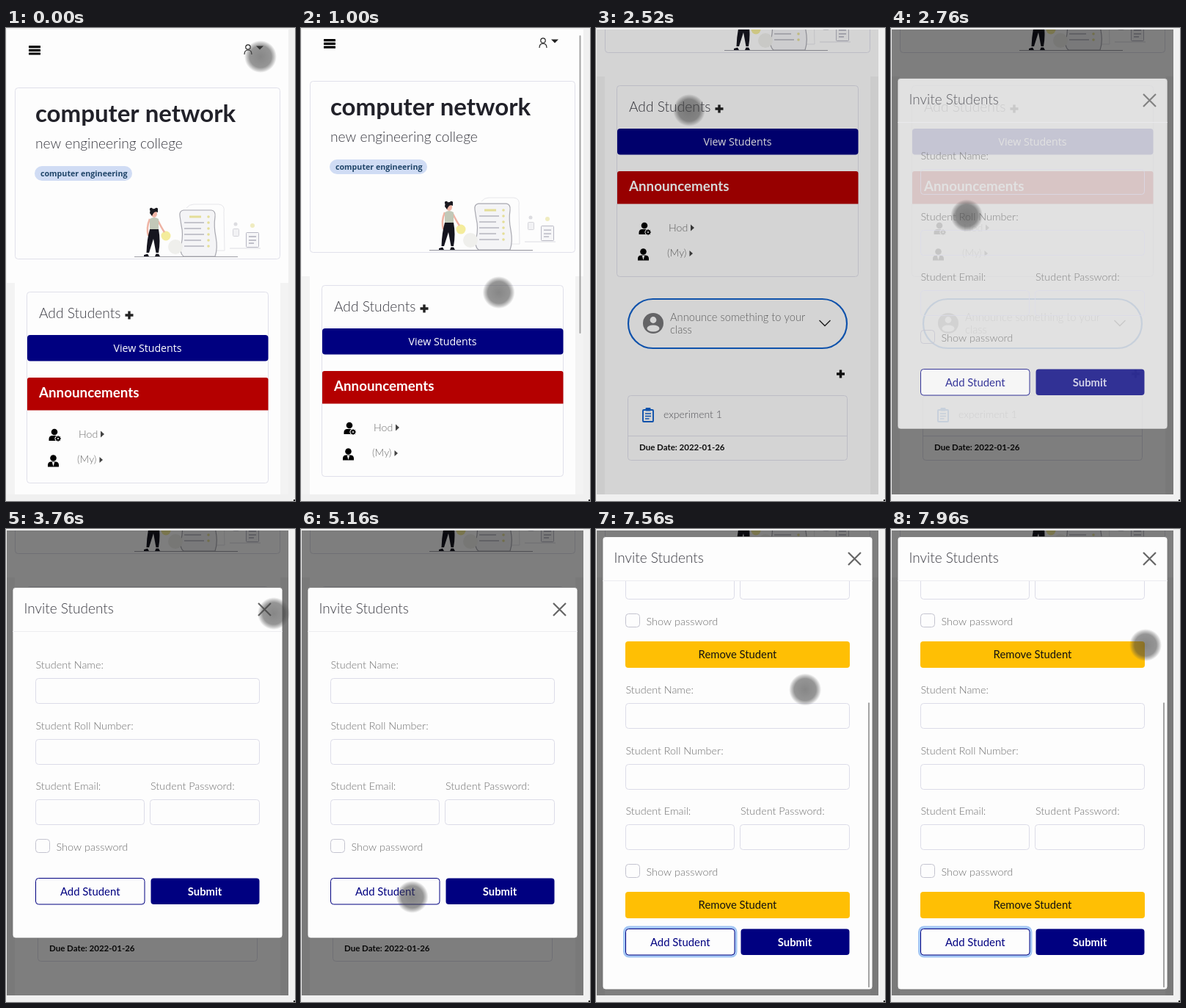
These frames come from a looping animation (394 by 644 pixels, 8 s). An HTML page with a canvas:

```html
<!DOCTYPE html>
<html lang="en">
<head>
<meta charset="utf-8">
<title>Classroom page</title>
<style>
html, body { margin: 0; width: 100%; height: 100%; overflow: hidden; background: #f0f0f0; }
canvas { display: block; }
</style>
</head>
<body>
<canvas id="stage" width="394" height="644"></canvas>
<script>
const ctx = document.getElementById('stage').getContext('2d');
const LOOP = 8000, OUTER = '#f0f0f0', PAPER = '#fdfdfd', LINE = '#e0e0ea';
const NAVY = '#000080', BLUE = '#1262cc', GREY = '#707070';
const HEAD = 'Lato, "Open Sans", sans-serif', UI = '"Open Sans", "Noto Sans", sans-serif';

// [time, x, y] of the touch pointer
const TOUCH = [
  [0, 347, 39], [40, 347, 39], [640, 272, 369], [800, 272, 369], [1560, 243, 278],
  [2040, 190, 154], [2400, 127, 112], [2580, 127, 112], [3000, 67, 473], [3140, 67, 473],
  [3760, 365, 115], [4620, 365, 115], [4760, 338, 40], [4920, 262, 270], [5080, 180, 521],
  [5160, 152, 501], [5360, 87, 497], [5460, 87, 497], [6300, 302, 193], [6720, 258, 431],
  [7140, 247, 457], [7560, 285, 219], [7960, 347, 158], [8000, 347, 158]
];
const SCROLL = [[0, 0], [800, 0], [1560, 91], [2040, 215], [2340, 281], [8000, 281]];

const clamp = (v, a = 0, b = 1) => Math.min(b, Math.max(a, v));
const ramp = (t, a, b) => clamp((t - a) / (b - a));
const easeOut = p => 1 - (1 - p) ** 3;

function slope(keys, i, k) {
  const a = keys[i - 1], b = keys[i], c = keys[i + 1];
  if (!a || !c || a[k] === b[k] || b[k] === c[k]) return 0;
  return (c[k] - a[k]) / (c[0] - a[0]);
}

// Cubic Hermite through timed keys, at rest beside every hold
function track(keys, t, k) {
  let i = 0;
  while (i < keys.length - 2 && t >= keys[i + 1][0]) i++;
  const a = keys[i], b = keys[i + 1], d = b[0] - a[0], p = clamp((t - a[0]) / d);
  const q = p * p, r = q * p;
  return a[k] * (2 * r - 3 * q + 1) + b[k] * (3 * q - 2 * r) +
    d * (slope(keys, i, k) * (r - 2 * q + p) + slope(keys, i + 1, k) * (r - q));
}

function box(x, y, w, h, r, fill, stroke, lw = 1) {
  ctx.beginPath();
  ctx.roundRect(x, y, w, h, r);
  if (fill) { ctx.fillStyle = fill; ctx.fill(); }
  if (stroke) { ctx.strokeStyle = stroke; ctx.lineWidth = lw; ctx.stroke(); }
}

function frame(x, y, w, h, r, stroke, fill) {
  box(x + .5, y + .5, w - 1, h - 1, r, fill, stroke);
}

function text(s, x, y, size, color, weight = 300, family = HEAD, align = 'left') {
  ctx.font = `${weight} ${size}px ${family}`;
  ctx.fillStyle = color;
  ctx.textAlign = align;
  ctx.fillText(s, x, y);
}

function dot(x, y, r, color, ry = r) {
  ctx.beginPath();
  ctx.ellipse(x, y, r, ry, 0, 0, 7);
  ctx.fillStyle = color;
  ctx.fill();
}

function shape(d, fill, stroke, lw = 1, x = 0, y = 0) {
  const path = new Path2D(d);
  ctx.save();
  ctx.translate(x, y);
  if (fill) { ctx.fillStyle = fill; ctx.fill(path); }
  if (stroke) { ctx.strokeStyle = stroke; ctx.lineWidth = lw; ctx.stroke(path); }
  ctx.restore();
}

function plus(x, y, color) {
  shape('M-5.5 0H5.5M0-5.5V5.5', null, color, 3.4, x, y);
}

function person(x, y) {
  dot(x, y - 4, 4.3, '#000');
  shape('M-7.5 8V5Q-7 1-3 1H3Q7 1 7.5 5V8Z', '#000', null, 1, x, y);
}

function gear(x, y) {
  dot(x, y, 4.6, PAPER);
  for (let i = 0; i < 4; i++) {
    const c = Math.cos(i * Math.PI / 4) * 3.8, s = Math.sin(i * Math.PI / 4) * 3.8;
    shape(`M${-c} ${-s}L${c} ${s}`, null, '#000', 1.6, x, y);
  }
  dot(x, y, 2.6, '#000');
  dot(x, y, 1.1, PAPER);
}

function illustration() {
  shape('M246 245Q250 240 256 240H290Q299 241 297 251L298 303H286', null, '#e6e6ea');
  shape('M237 256Q236 249 242 248H280Q286 249 285 257Q283 270 286 284Q289 300 285 311H242Q236 306 239 295Q242 280 239 269Z',
    '#f4f4f6', '#a8a8b0', 1.2);
  for (let i = 0; i < 6; i++) {
    const y = 257 + i * 8;
    shape(`M${i ? 243 : 250} ${y}H${i % 2 ? 270 : 266}`, null, i ? '#c4c4cc' : '#e4de98', i ? 2 : 3);
    dot(276, y, 1.8, '#e4de98');
  }
  dot(231, 298, 10, '#efefec');
  dot(218, 283, 6.5, '#f4ec9c');
  dot(313, 267, 2.5, '#dcdce0');
  box(309.5, 273.5, 8, 10, 1, '#f2f2f4', '#d4d4da');
  dot(336, 269, 3, '#f0ecc0');
  box(327.5, 278.5, 17, 20, 1, '#f6f6f8', '#b8b8c4');
  shape('M331 284H341M331 289H341M331 293H338', null, '#aeaeba', 1.3);
  shape('M305 300H347', null, '#dcdce2');
  shape('M196 260Q191 272 194 283M207 262Q212 272 216 278', null, '#eeb3a4', 2.5);
  shape('M196 260Q202 256 208 260L208 276H196Z', '#c2c8b8');
  shape('M196 274H208Q211 290 208 306H204.5L201 287L195 306H191.5Q192 288 196 274Z', '#15151f');
  shape('M188 311V309L193 307.5L195 311ZM203 311L204.5 307.5H208L210 311Z', '#15151f');
  dot(202, 253, 4, '#f0b6a6', 5);
  shape('M196 252Q196 246 202 246Q208 246 207 251Q202 248 199 256Z', '#1a1a20');
  dot(198, 247, 2.2, '#1a1a20');
  dot(205, 247, 2.2, '#1a1a20');
  shape('M175 311.5H316', null, '#a0a0a8', 1.2);
}

function page() {
  box(1, 347, 11, 700, 0, '#f3f3f3');
  box(374, 347, 11, 700, 0, '#f3f3f3');

  for (let i = 0; i < 3; i++) box(31, 24 + i * 4.7, 16, 3.2, .5, '#000');
  ctx.beginPath();
  ctx.arc(330, 26, 3.2, 0, 7);
  ctx.strokeStyle = '#222';
  ctx.lineWidth = 1.2;
  ctx.stroke();
  shape('M325 36Q325 30 330 30Q335 30 335 36', null, '#222', 1.2);
  shape('M341 24.5H351L346 29.5Z', '#222');

  frame(12, 81, 362, 234, 4, LINE);
  text('computer network', 40, 128, 33, '#212129', 700);
  text('new engineering college', 40, 164, 19.3, '#3c3c44');
  box(39, 188, 133, 20, 10, '#d0dcf4');
  text('computer engineering', 47, 202, 10.7, '#1f4468', 700, UI);
  illustration();

  frame(28, 359, 330, 261, 4, LINE);
  text('Add Students', 45, 395, 19.2, '#3c3c44');
  plus(168, 391, '#222');
  box(29, 418, 328.5, 35.5, 4, NAVY);
  text('View Students', 193, 441, 14.2, '#fff', 400, UI, 'center');
  box(29, 476, 328.5, 44.5, [3, 3, 0, 0], '#b40000');
  text('Announcements', 45, 503, 18.8, '#fff', 700);
  person(66, 554);
  gear(71, 559);
  text('Hod', 99, 558, 14.2, GREY);
  shape('M129 548.5L134 553L129 557.5Z', '#444');
  person(64.5, 589.5);
  shape('M62.8 591H66.2L64.5 597Z', PAPER);
  text('(My)', 97, 592, 14, GREY);
  shape('M127.5 584L132 588L127.5 592Z', '#444');

  box(44, 650, 298, 67, 33.5, PAPER, BLUE, 2.2);
  dot(78, 683, 14, '#77777a');
  dot(78, 678.5, 4.4, PAPER);
  dot(78, 690, 8.5, PAPER, 4.5);
  text('Announce something to your', 101, 680, 14.7, GREY);
  text('class', 101, 697, 14.7, GREY);
  shape('M304.5 679L312 686.5L319.5 679', null, '#222', 1.4);

  plus(333.5, 752, '#111');
  frame(43, 781, 300, 89, 4, LINE);
  box(64, 801, 14, 16, 1, null, BLUE, 1.9);
  box(67.5, 798, 7, 4.5, 1, BLUE);
  shape('M67 806H75M67 809.5H75M67 813H72.5', null, BLUE, 1.4);
  text('experiment 1', 92, 812, 14, '#606066');
  shape('M44 836.5H342', null, LINE);
  text('Due Date: 2022-01-26', 59, 856, 11.5, '#111', 700);
}

function label(s, x, y) {
  text(s + ':', x, y, 14.4, GREY);
}

function field(x, y, w) {
  frame(x, y, w, 35, 4, '#dcdce8');
}

function form(y, removable) {
  label('Student Name', 40.5, y + 110);
  field(40, y + 123, 306);
  label('Student Roll Number', 40.5, y + 193);
  field(40, y + 206, 306);
  label('Student Email', 40.5, y + 275);
  label('Student Password', 197, y + 275);
  field(40, y + 288, 149);
  field(196, y + 288, 150);
  frame(40, y + 342, 20, 19, 4, '#c4c4d0');
  text('Show password', 68.5, y + 358, 14.5, GREY);
  if (removable) {
    box(40, y + 380, 306, 36, 4, '#ffbf04');
    text('Remove Student', 193, y + 403, 14.8, '#111', 400, HEAD, 'center');
  }
}

function thumb(x, y, h) {
  box(x, y, 2, h, 1, '#a4a4a4');
}

function modal(grown, scroll) {
  const top = grown ? 11 : 80, bottom = grown ? 627 : 557;
  box(9, top - .5, 368, bottom - top + .5, 4, PAPER, '#707070', .8);
  ctx.save();
  ctx.beginPath();
  ctx.rect(9, top + 59, 368, bottom - top - 60);
  ctx.clip();
  const y = top - scroll;
  form(y, grown);
  if (grown) form(y + 341, true);
  const row = y + (grown ? 771 : 395);
  if (grown) box(39, row - 1.5, 151.5, 39, 6, null, '#a3c6f4', 4);
  frame(40, row, 149.5, 36.5, 4, NAVY, PAPER);
  text('Add Student', 114.7, row + 23.5, 14.9, NAVY, 400, HEAD, 'center');
  box(197.5, row + .5, 148, 35.5, 4, NAVY);
  text('Submit', 271, row + 23.5, 14.8, '#fff', 700, HEAD, 'center');
  ctx.restore();
  shape(`M9 ${top + 59.5}H377`, null, '#ececf0');
  text('Invite Students', 24.5, top + 35, 19, '#3c3c44');
  shape('M-8.5-8.5L8.5 8.5M8.5-8.5L-8.5 8.5', null, '#666', 2.2, 352.5, top + 29.5);
  if (grown) thumb(371, 72 + scroll * .69, 388);
}

function pointer(x, y) {
  const g = ctx.createRadialGradient(x, y, 0, x, y, 22);
  g.addColorStop(0, 'rgba(62,62,62,.62)');
  g.addColorStop(.68, 'rgba(68,68,68,.56)');
  g.addColorStop(.85, 'rgba(80,80,80,.3)');
  g.addColorStop(1, 'rgba(80,80,80,0)');
  dot(x, y, 22, g);
}

function draw(t) {
  const x = track(TOUCH, t, 1), y = track(TOUCH, t, 2), scroll = track(SCROLL, t, 1);
  box(0, 0, 394, 644, 0, OUTER);
  box(392, 642, 2, 2, 0, '#111');

  ctx.save();
  ctx.beginPath();
  ctx.rect(1, 2, 384, 633);
  ctx.clip();
  box(0, 0, 394, 644, 0, PAPER);
  ctx.save();
  ctx.translate(0, -scroll);
  page();
  ctx.restore();

  ctx.globalAlpha = ramp(t, 800, 880) * (1 - ramp(t, 2340, 2480));
  thumb(379.5, 4 + scroll * .66, 406);
  ctx.globalAlpha = 1;

  box(0, 0, 394, 644, 0, `rgba(0,0,0,${.5 * ramp(t, 2470, 2630)})`);

  const show = easeOut(ramp(t, 2630, 2960));
  if (show) {
    ctx.save();
    ctx.globalAlpha = show;
    ctx.translate(0, -50 * (1 - show));
    modal(t >= 5480, t < 7140 ? 0 : clamp(457 - y, 0, 238));
    ctx.restore();
  }
  ctx.restore();
  pointer(x, y);
}

const start = performance.now();
function tick() {
  draw((performance.now() - start) % LOOP);
  requestAnimationFrame(tick);
}
tick();
</script>
</body>
</html>
```
